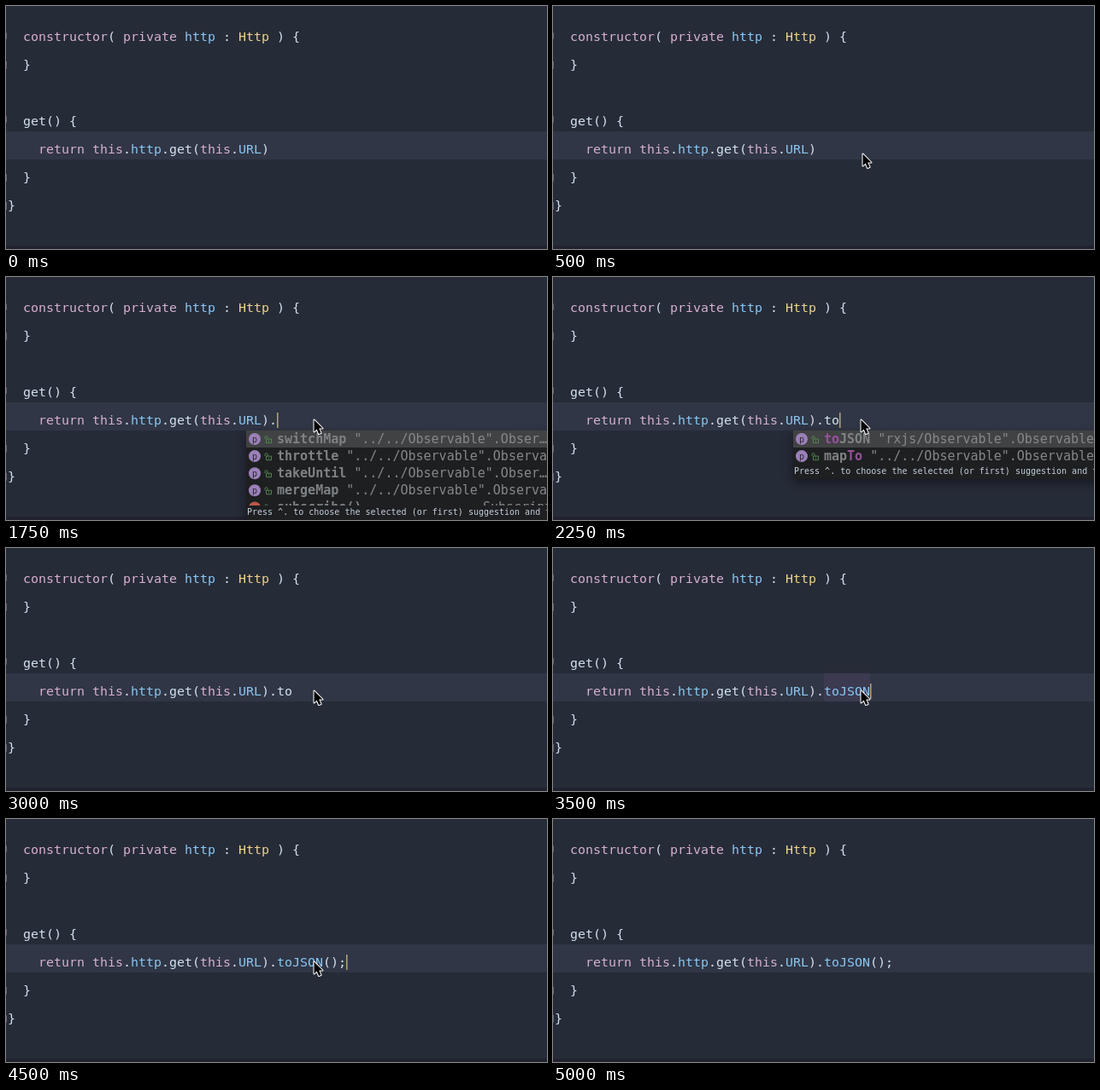
Write an HTML page with a canvas that moves like this. It is 633 px wide and 285 px high and loops after 5.75 s.

```html
<!DOCTYPE html>
<html lang="en">
<head>
<meta charset="utf-8">
<title>Code completion</title>
<style>
  html, body { margin: 0; width: 100%; height: 100%; overflow: hidden; background: #262b38; }
  canvas { display: block; }
</style>
</head>
<body>
<canvas id="stage" width="633" height="285"></canvas>
<script>
const ctx = document.getElementById('stage').getContext('2d');
const LOOP = 5750, CELL = 9, LEFT = 20, ROW = 33;
const MONO = '"DejaVu Sans Mono", monospace';
const CODE_FONT = '14.95px ' + MONO;
const pink = '#d6b0d0', blue = '#8ac6f2', white = '#d3e1ee', yellow = '#ecd28c';
const violet = '#9a80b8', red = '#b9594c', grey = '#7d8285', match = '#96529a';

const statement = [
  [pink, 'return '], [pink, 'this'], [white, '.'], [blue, 'http'],
  [white, '.get('], [pink, 'this'], [white, '.'], [blue, 'URL'], [white, ')'],
];
const path = '"../../Observable"';
const allItems = {
  rows: [
    [[grey, 'switchMap'], path + '.Obser…'],
    [[grey, 'throttle'], path + '.Observable'],
    [[grey, 'takeUntil'], path + '.Obser…'],
    [[grey, 'mergeMap'], path + '.Observable'],
    [[grey, 'subscribe()'], '', 'Subscription'],
  ],
  footer: 268,
};
const toItems = {
  rows: [
    [[match, 'to', grey, 'JSON'], '"rxjs/Observable".Observable'],
    [[grey, 'map', match, 'To'], path + '.Observable'],
  ],
  footer: 220,
};

// Each step holds until the next one; marks are [column, length, colour].
const bracket = '#3a70a8', usage = '#3b3a50';
const call = [[blue, 'toJSON'], [white, '()']];
const done = [...call, [white, ';']];
const steps = [
  { at: 0 },
  { at: 250, pointer: [34.5, 47.5] },
  { at: 500, pointer: [362, 173] },
  { at: 750, pointer: [360, 167] },
  { at: 1000, pointer: [360, 167], caret: 32, marks: [[22, 1, bracket], [31, 1, bracket]] },
  { at: 1750, pointer: [360, 167], caret: 33, tail: [[white, '.']], popup: allItems },
  { at: 2250, pointer: [360, 167], caret: 35, tail: [[white, '.to']], popup: toItems },
  { at: 3000, pointer: [360, 167], tail: [[white, '.to']] },
  { at: 3250, pointer: [360, 167], caret: 39, tail: [[white, '.toJSON']] },
  { at: 3500, pointer: [360, 167], caret: 39, tail: [[white, '.'], [blue, 'toJSON']], marks: [[33, 6, usage]] },
  { at: 3750, pointer: [360, 167], caret: 40, tail: [[white, '.'], ...call] },
  { at: 4000, pointer: [360, 167], caret: 41, tail: [[white, '.'], ...call], marks: [[33, 6, usage], [39, 2, bracket]] },
  { at: 4250, pointer: [360, 167], caret: 42, tail: [[white, '.'], ...done], marks: [[39, 2, bracket]] },
  { at: 4500, pointer: [360, 167], caret: 42, tail: [[white, '.'], ...done] },
  { at: 4750, pointer: [436, 166], tail: [[white, '.'], ...done] },
  { at: 5000, tail: [[white, '.'], ...done] },
];

function rect(color, x, y, w, h) {
  ctx.fillStyle = color;
  ctx.fillRect(x, y, w, h);
}

function text(color, string, x, y, font = CODE_FONT) {
  ctx.font = font;
  ctx.fillStyle = color;
  ctx.fillText(string, x, y);
}

function codeLine(row, column, parts) {
  for (const [color, string] of parts) {
    text(color, string, LEFT + column * CELL, 41 + row * ROW);
    column += string.length;
  }
}

function stroke(color, d, width = 1) {
  ctx.strokeStyle = color;
  ctx.lineWidth = width;
  ctx.stroke(new Path2D(d));
}

function drawGutter() {
  const color = '#626773';
  for (const y of [31, 129]) stroke(color, `M-1 ${y}.5H.5V${y + 7}.5H-1`);
  for (const y of [65, 197, 230]) stroke(color, `M.5 ${y}V${y + 8}.5H-1`);
}

function drawIcons(y, color, letter) {
  ctx.fillStyle = color;
  ctx.beginPath();
  ctx.arc(291, y, 7, 0, Math.PI * 2);
  ctx.fill();
  ctx.textAlign = 'center';
  text('#2b2632', letter, 291, y + 3.5, '10px ' + MONO);
  ctx.textAlign = 'left';
  stroke('#50854e', `M303 ${y}v-2a1.5 1.5 0 0 1 3 0v2M304.5 ${y}h6v4.5h-6zM307.5 ${y + 1.5}v1.5`);
}

function drawPopup({ rows, footer }) {
  const top = 180, left = 281;
  ctx.save();
  ctx.shadowColor = 'rgba(0,0,0,.45)';
  ctx.shadowBlur = 12;
  ctx.shadowOffsetY = 5;
  rect('#1e1f21', left, top, 360, footer + 16 - top);
  ctx.restore();

  ctx.save();
  ctx.beginPath();
  ctx.rect(left, top, 360, footer - top);
  ctx.clip();
  rect('#414244', left, top, 360, 20);
  rows.forEach(([name, detail, type], i) => {
    const y = 190 + i * 20.1;
    drawIcons(y, type ? red : violet, type ? 'm' : 'p');
    let x = 317;
    for (let k = 0; k < name.length; k += 2) {
      text(name[k], name[k + 1], x, y + 5, 'bold 15px ' + MONO);
      x += ctx.measureText(name[k + 1]).width;
    }
    text('#85888a', detail, x + 9, y + 5, '15px ' + MONO);
    if (type) text('#85888a', type, 558, y + 5, '15px ' + MONO);
  });
  ctx.restore();
  rect('#1e1f21', left, footer, 360, 17);
  text('#c3cfdb', 'Press ^. to choose the selected (or first) suggestion and then',
    282, footer + 11, '10px ' + MONO);
}

function drawPointer([x, y]) {
  ctx.save();
  ctx.translate(x, y);
  const arrow = new Path2D('M.5 .5V14.5L3.7 11.5L6 17L8.6 16L6.2 10.6H10.5Z');
  ctx.lineJoin = 'round';
  ctx.strokeStyle = '#fff';
  ctx.lineWidth = 2;
  ctx.stroke(arrow);
  ctx.fillStyle = '#000';
  ctx.fill(arrow);
  ctx.restore();
}

function draw({ pointer, caret, tail = [], marks = [], popup }) {
  rect('#262b38', 0, 0, 633, 285);
  rect('#303645', 0, 147, 633, 33);
  rect('#22222f', 0, 281, 633, 4);
  for (const [column, length, color] of marks) {
    rect(color, LEFT + column * CELL, 147, length * CELL, 33);
  }
  drawGutter();
  codeLine(0, 0, [
    [pink, 'constructor'], [white, '( '], [pink, 'private '], [blue, 'http '],
    [white, ': '], [yellow, 'Http '], [white, ') {'],
  ]);
  codeLine(1, 0, [[white, '}']]);
  codeLine(3, 0, [[white, 'get() {']]);
  codeLine(4, 2, [...statement, ...tail]);
  codeLine(5, 0, [[white, '}']]);
  codeLine(6, -2, [[white, '}']]);
  if (popup) drawPopup(popup);
  if (caret) rect('#b3a57c', LEFT + caret * CELL, 159, 1.5, 18);
  if (pointer) drawPointer(pointer);
}

const start = performance.now();
function tick() {
  const time = Math.max(0, performance.now() - start) % LOOP;
  draw(steps.findLast(step => step.at <= time));
  requestAnimationFrame(tick);
}
tick();
</script>
</body>
</html>
```
